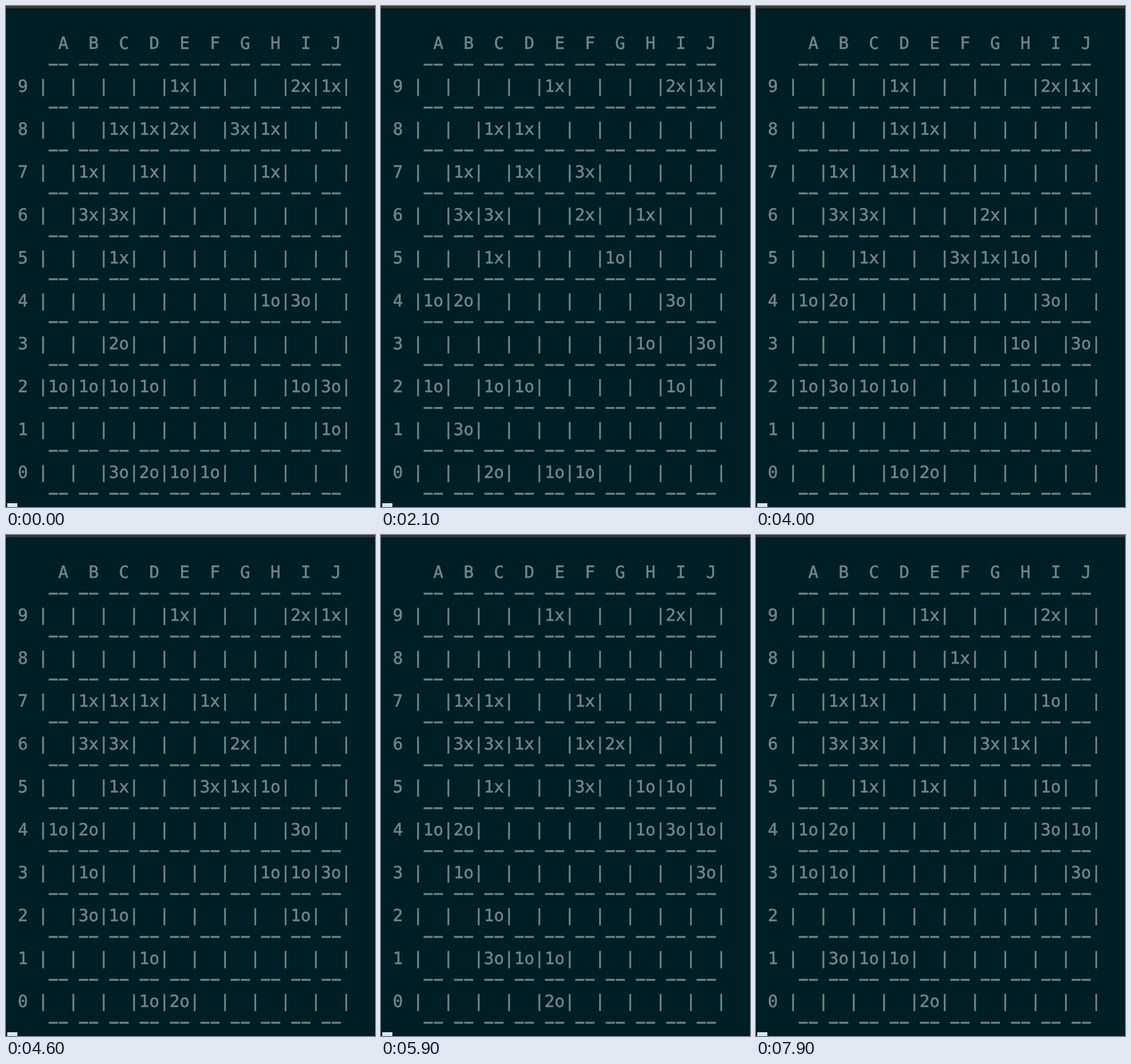
An HTML page for the animation above (8 s loop, 584x794 px).

```html
<!DOCTYPE html>
<html lang="en">
<head>
<meta charset="utf-8">
<title>Board game</title>
<style>
  html, body { margin: 0; width: 100%; height: 100%; overflow: hidden; background: #001e25; }
  svg { display: block; width: 584px; height: 794px; }
  text {
    font: 26.576px "DejaVu Sans Mono", "Liberation Mono", monospace;
    fill: #728486;
    stroke: #728486;
    stroke-width: .6;
    white-space: pre;
    text-rendering: geometricPrecision;
  }
  .rule { stroke: #728486; stroke-width: 3; stroke-dasharray: 14.5 1.5 14.5 17.5; }
</style>
</head>
<body>
<svg id="term" viewBox="0 0 584 794">
  <rect width="584" height="4" fill="#353537"/>
  <rect y="4" width="584" height="1" fill="#0a0c0d"/>
  <rect x="2" y="788" width="16" height="6" fill="#cfe9f7"/>
</svg>
<script>
const LOOP = 8000, STEP = 100;
const LEFT = 2.8, TOP = 40, LINE = 34, BASE = 27.6;
const COLS = [...'ABCDEFGHIJ'];

// Opening position: square followed by piece
const START = `E91x I92x J91x C81x D81x E82x G83x H81x B71x D71x H71x B63x C63x C51x
  H41o I43o C32o A21o B21o C21o D21o I21o J23o J11o C03o D02o E01o F01o`;

// Runs of moves, one entry every 100 ms from the given time; "+" joins moves made together
const RUNS = {
  100: 'C0B1 G8F7 C3B4',
  500: 'E8E7 B2B3 H8I7 B3A4 I7H6 D0B0 H6G5 H4G5 H7G7',
  1400: 'I2H3 E7F6 J1I2 G7G6 J2J3',
  2000: 'G6H6 B0C0',
  2300: 'H6G6 G5H5 G6G5 F0G1 C8D9 B1B2',
  3100: 'E9E8',
  3300: 'G1H2',
  3600: 'F6G6 E0D0 F7F5',
  4000: 'C0E0 E8F7 A2B3 D8C7 D2D1 D9E9 H2I3 J9J8 I3J4',
  4900: 'J8J7 C5B5+G5F6',
  5200: 'H3H4',
  5400: 'J7J6+I2I3 B2C1 J6I5+D0E1 H5I5 H4H5+D7D6 I3H4+B5C5',
  6000: 'F7G7 E1F1 F6F7 F1E1 F5H7 C1C0 A4A3 C2B2 A3A4',
  7000: 'E1D0 F7F8 D0C1 D6E5+H5G6 H7G6 I5I6 G7H6+H4I5 I6I7 B2A3 C0B1'
};

const moves = Object.entries(RUNS).flatMap(([start, run]) =>
  run.split(' ').flatMap((entry, i) =>
    entry.split('+').map(m => ({ at: +start + i * STEP, from: m.slice(0, 2), to: m.slice(2) }))));

const term = document.getElementById('term');

function add(tag, attrs) {
  const el = document.createElementNS('http://www.w3.org/2000/svg', tag);
  for (const key in attrs) el.setAttribute(key, attrs[key]);
  return term.appendChild(el);
}

const textLine = n => add('text', { x: LEFT, y: TOP + n * LINE + BASE });

function ruleLine(n) {
  const y = TOP + n * LINE + 19;
  add('line', { class: 'rule', x1: 67.5, x2: 530, y1: y, y2: y });
}

textLine(0).textContent = '     ' + COLS.join('  ');
ruleLine(1);
const rows = [];
for (let r = 9; r >= 0; r--) {
  const n = 2 + (9 - r) * 2;
  rows[r] = textLine(n);
  ruleLine(n + 1);
}

function boardAt(count) {
  const board = {};
  for (const p of START.split(/\s+/)) board[p.slice(0, 2)] = p.slice(2);
  for (const { from, to } of moves.slice(0, count)) {
    board[to] = board[from];
    delete board[from];
  }
  return board;
}

let shown = -1;

function draw(time) {
  const count = moves.filter(m => m.at <= time).length;
  if (count === shown) return;
  shown = count;
  const board = boardAt(count);
  rows.forEach((row, r) => {
    row.textContent = ` ${r} |` + COLS.map(c => (board[c + r] || '  ') + '|').join('');
  });
}

const begin = performance.now();
function tick() {
  draw((performance.now() - begin) % LOOP);
  requestAnimationFrame(tick);
}
tick();
</script>
</body>
</html>
```
